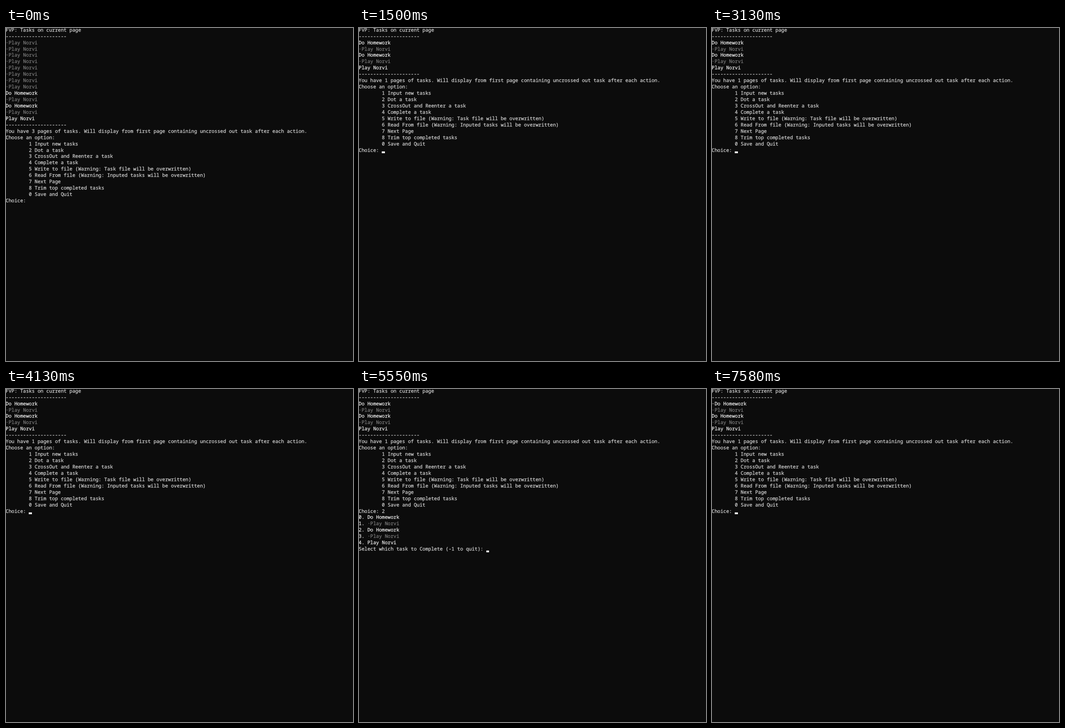
An HTML page for the animation above (8000 ms loop, 763 px wide and 734 px high).

```html
<!DOCTYPE html>
<html lang="en">
<head>
<meta charset="utf-8">
<title>Task console</title>
<style>
  html, body { margin: 0; width: 100%; height: 100%; overflow: hidden; background: #0c0c0c; }
  #screen {
    position: absolute; left: -0.7px; top: -1.3px; margin: 0;
    font: 10.633px/13.94px "Noto Sans Mono", "DejaVu Sans Mono", monospace;
    font-variant-ligatures: none; text-rendering: geometricPrecision;
    -webkit-text-stroke: 0.25px; color: #d6d6d6;
  }
  .open { color: #f2f2f2; }
  .done { color: #7c7c7c; }
  #cursor { position: absolute; width: 6.38px; height: 3.5px; background: #f2f2f2; }
</style>
</head>
<body>
<pre id="screen"></pre>
<div id="cursor"></div>
<script>
const LOOP = 8000, CELL_W = 6.38, CELL_H = 13.93;
const screen = document.getElementById("screen");
const cursor = document.getElementById("cursor");

const paint = (kind, text) => `<span class="${kind}">${text}</span>`;
const homework = paint("open", "Do Homework");
const dotted = paint("open", "·Do Homework");
const game = paint("open", "Play Norvi");
const played = paint("done", "·Play Norvi");

const rule = "-".repeat(21);
const options = [
  "1 Input new tasks",
  "2 Dot a task",
  "3 CrossOut and Reenter a task",
  "4 Complete a task",
  "5 Write to file (Warning: Task file will be overwritten)",
  "6 Read From file (Warning: Inputed tasks will be overwritten)",
  "7 Next Page",
  "8 Trim top completed tasks",
  "0 Save and Quit",
].map(option => " ".repeat(8) + option);

const page = (tasks, pages) => [
  "FVP: Tasks on current page", rule, ...tasks, rule,
  `You have ${pages} pages of tasks. Will display from first page containing uncrossed out task after each action.`,
  "Choose an option:", ...options, "Choice: ",
].join("\n");

const tail = [played, homework, played, game];
const trimmed = [homework, ...tail];
const fullPage = page([...Array(8).fill(played), ...trimmed], 3);
const shortPage = page(trimmed, 1);
const selectPage = [
  shortPage + "2",
  ...trimmed.map((task, i) => paint("open", `${i}. `) + task),
  "Select which task to Complete (-1 to quit): ",
].join("\n");
const dottedPage = page([dotted, ...tail], 1);

// Start time, screen text, cursor visible
const steps = [
  [0, fullPage, false],
  [500, fullPage, true],
  [880, fullPage, false],
  [1080, fullPage + "8", true],
  [1500, shortPage, true],
  [2520, shortPage, false],
  [3130, shortPage, true],
  [3530, shortPage, false],
  [4130, shortPage, true],
  [4750, shortPage, false],
  [5150, shortPage + "2", true],
  [5550, selectPage, true],
  [6160, selectPage, false],
  [6780, selectPage, true],
  [7380, selectPage + "0", false],
  [7580, dottedPage, true],
];

let shown;
function draw(now) {
  const time = now % LOOP;
  const step = steps.findLast(([start]) => start <= time);
  if (step !== shown) {
    shown = step;
    const [, text, visible] = step;
    screen.innerHTML = text;
    const lines = text.split("\n");
    cursor.style.left = lines.at(-1).length * CELL_W - 0.7 + "px";
    cursor.style.top = (lines.length - 1) * CELL_H + 7.8 + "px";
    cursor.hidden = !visible;
  }
  requestAnimationFrame(draw);
}
draw(performance.now());
</script>
</body>
</html>
```
